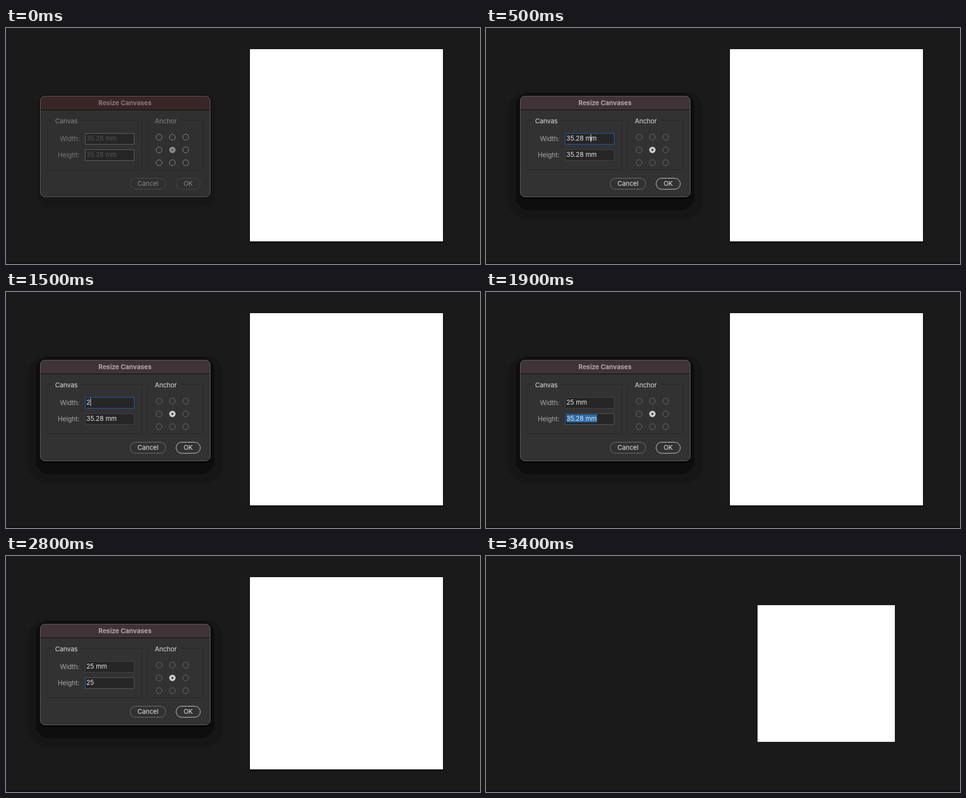
Animation of 960x480 px, one loop 5.1 s. Source, as an HTML page:

```html
<!DOCTYPE html>
<html lang="en">
<head>
<meta charset="utf-8">
<title>Resize Canvases</title>
<style>
  html, body { margin: 0; width: 100%; height: 100%; overflow: hidden; background: #1a1a1a; }
  svg { display: block; width: 960px; height: 480px; }
  text { font: 13px Inter, "Liberation Sans", sans-serif; }
</style>
</head>
<body>
<svg id="stage" viewBox="0 0 960 480" xmlns="http://www.w3.org/2000/svg"></svg>
<script>
const LOOP = 5100;
const NS = "http://www.w3.org/2000/svg";
const stage = document.getElementById("stage");

function set(el, attrs) {
  for (const key in attrs) el.setAttribute(key, attrs[key]);
  return el;
}

function add(parent, tag, attrs) {
  return parent.appendChild(set(document.createElementNS(NS, tag), attrs));
}

function rect(parent, x, y, width, height, attrs) {
  return add(parent, "rect", { x, y, width, height, ...attrs });
}

function label(parent, x, y, string, attrs) {
  const el = add(parent, "text", { x, y, ...attrs });
  el.textContent = string;
  return el;
}

function show(el, on) {
  el.setAttribute("visibility", on ? "visible" : "hidden");
}

// Blend two greys or rgb triples
function mix(a, b, k) {
  const from = [].concat(a), to = [].concat(b);
  const part = i => Math.round(from[i % from.length] + (to[i % to.length] - from[i % from.length]) * k);
  return `rgb(${part(0)},${part(1)},${part(2)})`;
}

// Value of the last step at or before t
function stepAt(steps, t) {
  let value = steps[0][1];
  for (const [start, v] of steps) if (t >= start) value = v;
  return value;
}

// Parts whose colour follows the window becoming active
const tints = [];
function tint(el, attr, from, to, group = "body") {
  tints.push({ el, attr, from, to, group });
  return el;
}

// Background and page
rect(stage, 0, 0, 960, 480, { fill: "#1a1a1a" });
rect(stage, 0, 478, 960, 2, { fill: "#150d11" });
const pageShade = add(stage, "g", {});
rect(pageShade, 492, 42, 395, 397, { rx: 3, fill: "#161616" });
rect(pageShade, 493, 42, 393, 394, { rx: 1, fill: "#0e0e0e" });
const page = rect(stage, 494, 43, 391, 391, { fill: "#fff" });

// Dialog frame
const dialog = add(stage, "g", {});
const farShade = rect(dialog, 44, 130, 396, 258, { rx: 38, fill: "#161616" });
const midShade = rect(dialog, 60, 132, 362, 239, { rx: 28, fill: "#0e0e0e" });
const nearShade = rect(dialog, 68, 137, 347, 211, { rx: 11, fill: "#060606" });
const faintShade = rect(dialog, 62, 134, 362, 230, { rx: 24, fill: "#171717" });
rect(dialog, 68, 137, 347, 208, { rx: 11, fill: "#070707" });
tint(rect(dialog, 69, 138, 345, 206, { rx: 10 }), "fill", 48, 50);
tint(add(dialog, "path", { d: "M69 166V148a10 10 0 0 1 10-10H404a10 10 0 0 1 10 10V166Z" }),
  "fill", [57, 39, 40], [64, 51, 55]);
rect(dialog, 69, 166, 345, 1, { fill: "#080808" });
rect(dialog, 69.5, 138.5, 344, 205, { rx: 9.5, fill: "none", stroke: "#686868" });
tint(label(dialog, 241, 156.5, "Resize Canvases", { "text-anchor": "middle", "font-weight": 700, style: "font-weight:700" }),
  "fill", [136, 121, 122], [177, 168, 171]);

// Group boxes, with a gap in the top edge for the legend
function groupBox(left, right, gapEnd, title) {
  add(dialog, "path", {
    d: `M${left + 10} 187.5H${left}V288.5H${right}V187.5H${gapEnd}`,
    fill: "none", stroke: "#262626"
  });
  tint(label(dialog, left + 15, 194, title, {}), "fill", 136, 226);
}
groupBox(84.5, 275.5, 150, "Canvas");
groupBox(286.5, 398.5, 352, "Anchor");

function makeField(y, name) {
  tint(label(dialog, 149, y + 16, name, { "text-anchor": "end" }), "fill", 122, 170);
  const box = rect(dialog, 160.5, y + .5, 99, 22, { fill: "#262626" });
  const edge = rect(dialog, 160, y, 1, 23, { fill: "#1769d2" });
  const mark = rect(dialog, 163, y + 2, 62, 16, { fill: "#2a6dab" });
  const text = label(dialog, 162.7, y + 15, "", {});
  const caret = rect(dialog, 0, y + 2, 1, 16, { fill: "#f0f0f0" });
  return { box, edge, mark, text, caret };
}
const widthField = makeField(214, "Width:");
const heightField = makeField(247, "Height:");

// Anchor radios
for (let i = 0; i < 9; i++) {
  const at = { cx: 310 + 27 * (i % 3), cy: 222 + 26 * Math.floor(i / 3) };
  if (i === 4) {
    tint(add(dialog, "circle", { ...at, r: 6.5 }), "fill", 138, 204);
    tint(add(dialog, "circle", { ...at, r: 2 }), "fill", 75, 38);
  } else {
    tint(add(dialog, "circle", { ...at, r: 6, fill: "none" }), "stroke", 152, 116);
  }
}

function button(x, width, title, line) {
  const pill = rect(dialog, x + .5, 305.5, width - 1, 22.5, { rx: 11.25, fill: "none" });
  tint(pill, "stroke", 78, line, "button");
  tint(label(dialog, x + width / 2, 321, title, { "text-anchor": "middle" }), "fill", 136, 232, "button");
}
button(251, 73, "Cancel", 122);
button(344, 50, "OK", 226);

const bodySteps = [[0, 0], [100, .3], [200, .6], [400, .85], [500, 1]];
const buttonSteps = [[0, 0], [400, .5], [500, 1]];

// Each state: text, caret position (0 for none), selected
const widthSteps = [
  [0, ["35.28 mm", 0, false]],
  [500, ["35.28 mm", 212, false]],
  [1100, ["35.28 mm", 0, true]],
  [1500, ["2", 171, false]],
  [1700, ["25", 178, false]],
  [1900, ["25 mm", 0, false]]
];
const heightSteps = [
  [0, ["35.28 mm", 0, false]],
  [1900, ["35.28 mm", 0, true]],
  [2200, ["2", 171, false]],
  [2300, ["25", 178, false]],
  [2800, ["25", 0, false]]
];

function drawField(field, [string, caretX, selected], stroke, edge, active) {
  field.text.textContent = string;
  set(field.text, { fill: mix(84, 232, active) });
  set(field.box, { stroke });
  set(field.caret, { x: caretX });
  show(field.caret, caretX > 0);
  show(field.mark, selected);
  show(field.edge, edge);
}

function render(t) {
  const open = t < 3400;
  dialog.style.display = pageShade.style.display = open ? "" : "none";
  set(page, open
    ? { x: 494, y: 43, width: 391, height: 391 }
    : { x: 550, y: 100, width: 278, height: 278 });
  if (!open) return;

  const active = stepAt(bodySteps, t);
  const levels = { body: active, button: stepAt(buttonSteps, t) };
  for (const { el, attr, from, to, group } of tints) el.setAttribute(attr, mix(from, to, levels[group]));
  for (const shade of [farShade, midShade, nearShade]) set(shade, { opacity: active });
  set(faintShade, { opacity: 1 - active });

  const plain = mix(104, 70, active);
  const onWidth = t >= 500 && t < 1900;
  const onHeight = t >= 1900;
  drawField(widthField, stepAt(widthSteps, t), onWidth ? "#1762c4" : plain, false, active);
  drawField(heightField, stepAt(heightSteps, t), onHeight ? "#5c5c5c" : plain, onHeight, active);
}

const begin = performance.now();
function tick() {
  render((performance.now() - begin) % LOOP);
  requestAnimationFrame(tick);
}
render(0);
requestAnimationFrame(tick);
</script>
</body>
</html>
```
